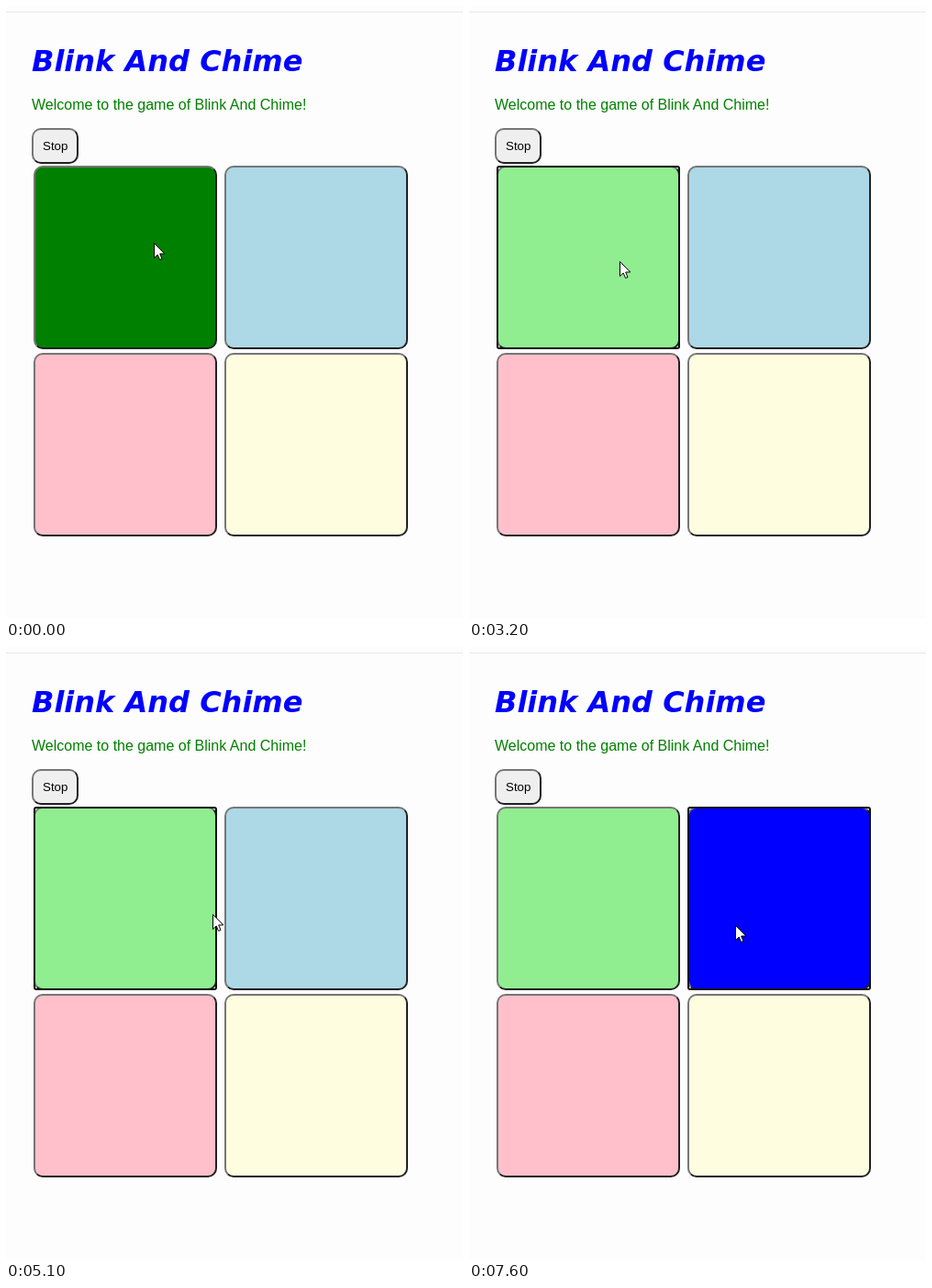
Write an HTML page that moves like this. It is 498 px wide and 668 px high and loops after 8000 ms.

```html
<!DOCTYPE html>
<html lang="en">
<head>
<meta charset="utf-8">
<title>Blink And Chime</title>
<style>
  html, body { margin: 0; width: 100%; height: 100%; overflow: hidden; background: #fdfdfd; }
  #stage { position: relative; width: 498px; height: 668px; overflow: hidden; }
  .topline { position: absolute; top: 6px; width: 100%; height: 1px; background: #e9e9e9; }
  .button {
    position: absolute; box-sizing: border-box; border: 2px solid;
    border-color: #767676 #212121 #212121 #767676; border-radius: 10px;
  }
  .pad, #focus { width: 200px; height: 200px; }
  .left { left: 30px; }
  .right { left: 238px; }
  .upper { top: 174px; }
  .lower { top: 378px; }
  #stop { left: 28px; top: 133px; width: 51px; height: 39px; background: #efefef; }
  #focus { position: absolute; box-sizing: border-box; border: 2px solid #101010; border-radius: 3px; }
  svg { position: absolute; inset: 0; }
  text { font-family: "Liberation Sans", Arial, sans-serif; }
  .title { font: italic bold 32px "DejaVu Sans", Verdana, sans-serif; fill: #00f; }
</style>
</head>
<body>
<div id="stage">
  <div class="topline"></div>
  <div class="button" id="stop"></div>
  <div class="button pad left upper" id="green"></div>
  <div class="button pad right upper" id="blue"></div>
  <div class="button pad left lower" style="background: #ffc0cb"></div>
  <div class="button pad right lower" style="background: #fffde0"></div>
  <div id="focus" class="upper"></div>
  <svg width="498" height="668">
    <text class="title" x="28" y="71">Blink And Chime</text>
    <text x="28" y="113" font-size="16" fill="#008000">Welcome to the game of Blink And Chime!</text>
    <text x="40" y="157" font-size="13.333">Stop</text>
    <path id="cursor" d="M.5 .5V16.6L4.2 13 6.6 18.5 9 17.5 6.7 12H11.8Z" fill="#fff" stroke="#000"/>
  </svg>
</div>
<script>
  const LOOP = 8000;
  const FOCUS_GREEN = 1050, FOCUS_BLUE = 5370;

  // Intervals [on, off] during which each pad is lit.
  const lit = {
    green: [[0, 130], [1050, 1180], [2230, 3200], [4950, 5100], [6350, 7190]],
    blue: [[3600, 4460], [5370, 5490], [7600, LOOP]]
  };

  // The pointer jumps to each [time, x, y].
  const pointer = [
    [0, 161, 258], [670, 161, 261], [790, 161, 265], [910, 162, 270],
    [1050, 162, 273], [1180, 163, 275], [1490, 163, 277], [1640, 164, 278],
    [4190, 165, 280], [4310, 166, 282], [4460, 168, 283], [4580, 170, 285],
    [4700, 172, 286], [5100, 225, 291], [5220, 303, 298], [5370, 298, 300],
    [5490, 295, 301], [5640, 292, 302], [5760, 290, 303]
  ];

  const [green, blue, focus, cursor] =
    ["green", "blue", "focus", "cursor"].map(id => document.getElementById(id));
  const isLit = (pad, t) => lit[pad].some(([on, off]) => t >= on && t < off);

  function draw(t) {
    green.style.background = isLit("green", t) ? "#008000" : "#90ee90";
    blue.style.background = isLit("blue", t) ? "#00f" : "#add8e6";
    focus.style.visibility = t < FOCUS_GREEN ? "hidden" : "visible";
    focus.style.left = (t < FOCUS_BLUE ? 30 : 238) + "px";
    const [, x, y] = pointer.findLast(([time]) => time <= t);
    cursor.setAttribute("transform", `translate(${x} ${y})`);
  }

  const start = performance.now();
  function tick() {
    draw((performance.now() - start) % LOOP);
    requestAnimationFrame(tick);
  }
  tick();
</script>
</body>
</html>
```
